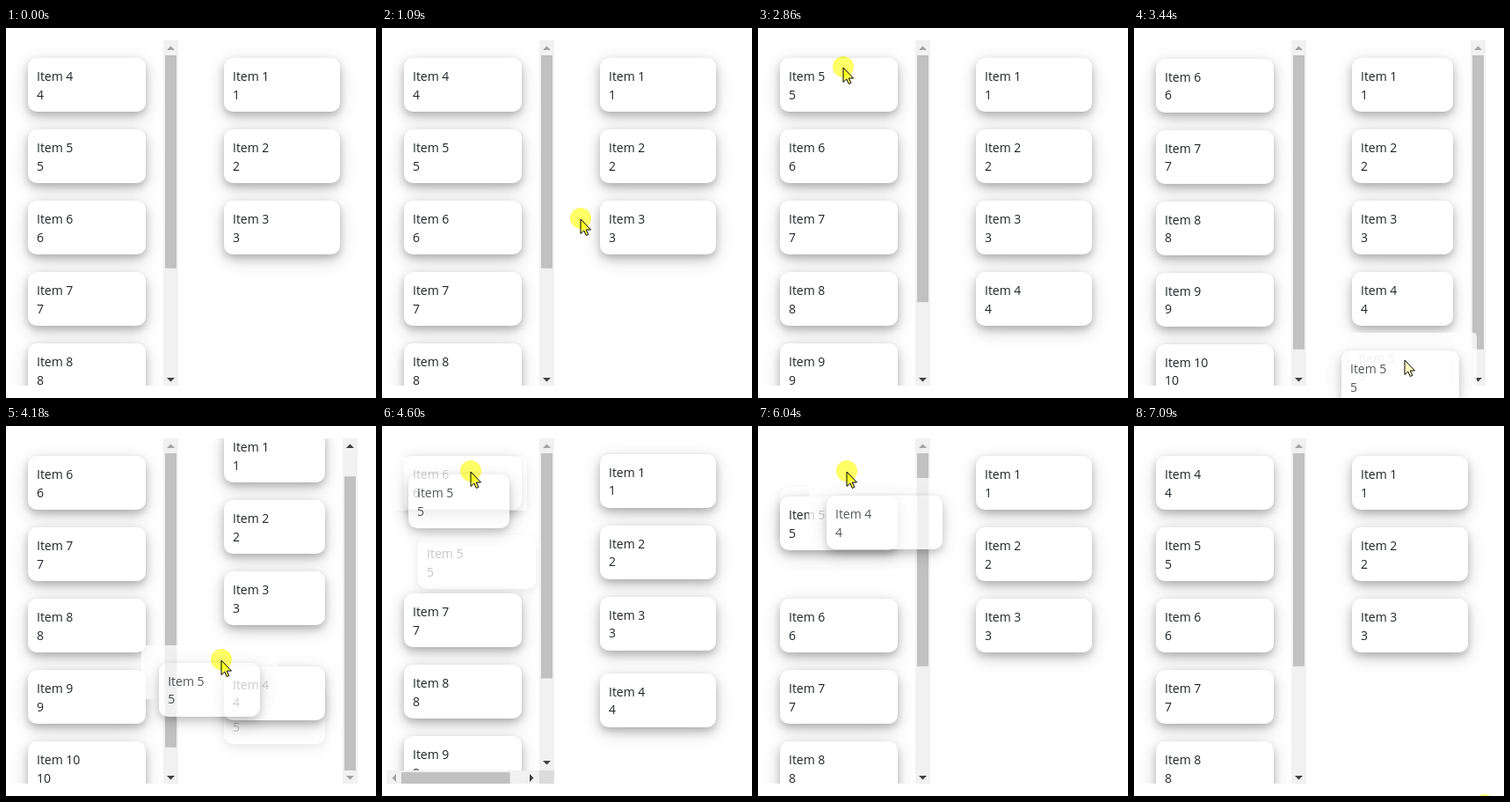
An HTML page for the animation above (7.18 s loop, 421 px wide and 420 px high).

```html
<!DOCTYPE html>
<html lang="en">
<head>
<meta charset="utf-8">
<title>Dragging items between two lists</title>
<style>
html, body { margin: 0; width: 100%; height: 100%; overflow: hidden; background: #fff; }
#stage { position: relative; width: 421px; height: 420px; overflow: hidden; }
#stage div, #stage svg { position: absolute; }
.list { top: 14px; overflow: hidden; }
.card {
  box-sizing: border-box; height: 61px; padding: 11px 10px 0; border-radius: 10px; background: #fff;
  box-shadow: 0 4px 8px rgba(0, 0, 0, .2), 0 6px 20px rgba(0, 0, 0, .19);
  color: #212529; white-space: nowrap; font: 14px/20.5px "Open Sans", "Noto Sans", sans-serif;
}
.ghost { height: 61px; border-radius: 4px; background: #fff; opacity: .77; }
.spot { width: 24px; height: 24px; border-radius: 50%; background: #ffff66; mix-blend-mode: multiply; }
</style>
</head>
<body>
<div id="stage"></div>
<script>
const LOOP = 7180, FLIP = 250, PITCH = 81, TOP = 14, BOTTOM = 406, HEIGHT = 394;
const stage = document.getElementById('stage');

// Each move puts one item at an index of the left (0) or right (1) list
const moves = [
  { at: 1490, id: 4, side: 1, index: 3 },
  { at: 3247, id: 5, side: 1, index: 4 },
  { at: 4150, id: 5, side: 1, index: 3 },
  { at: 4455, id: 5, side: 0, index: 1 },
  { at: 4670, id: 5, side: 0, index: 0 },
  { at: 5720, id: 4, side: 0, index: 1 },
  { at: 5980, id: 4, side: 0, index: 0 },
];
const steps = [{ at: 0, lists: [[4, 5, 6, 7, 8, 9, 10], [1, 2, 3]] }];
for (const { at, id, side, index } of moves) {
  const lists = steps.at(-1).lists.map(ids => ids.filter(i => i !== id));
  lists[side].splice(index, 0, id);
  steps.push({ at, lists });
}

// The dragged card hangs at a fixed offset from the cursor
const drags = [
  { id: 4, from: 1140, to: 2000, dx: 54, dy: 15, width: 134 },
  { id: 5, from: 2900, to: 3640, dx: 72, dy: 11, width: 134 },
  { id: 5, from: 3920, to: 4740, dx: 71, dy: -3, width: 115 },
  { id: 4, from: 5360, to: 6150, dx: 23, dy: -27, width: 132 },
];

// Cursor stops: time, x, y
const stops = [
  [130, 352, 434], [820, 91, 60], [1090, 226, 217], [1830, 298, 281], [2190, 296, 278],
  [2860, 97, 45], [3440, 308, 377], [3910, 320, 377], [4600, 101, 52], [4740, 101, 52],
  [5340, 300, 295], [5480, 245, 238], [6000, 101, 52], [6200, 101, 52],
  [6820, 399, 450], [7090, 399, 431],
];

function cursorAt(t) {
  const i = stops.findIndex(s => s[0] > t);
  if (i < 1) return stops.at(i).slice(1);
  const [t0, x0, y0] = stops[i - 1], [t1, x1, y1] = stops[i];
  const p = (t - t0) / (t1 - t0), k = p * p * (3 - 2 * p);
  return [x0 + (x1 - x0) * k, y0 + (y1 - y0) * k];
}

const box = (x, y, w, h, color) =>
  `<div style="left:${x}px;top:${y}px;width:${w}px;height:${h}px;background:${color}"></div>`;

const card = (id, x, y, width, opacity = 1) =>
  `<div class="card" style="left:${x}px;top:${y}px;width:${width}px;opacity:${opacity}">Item ${id}<br>${id}</div>`;

// The right list scrolls to its end during the third drag
const rightScroll = t => t < 3920 || t >= 4455 ? 0 : Math.min(31, (t - 3920) / 5);

function slot({ lists: [left, right] }, id, t) {
  const i = left.indexOf(id);
  return i >= 0 ? [25, 34 + PITCH * i] : [248, 34 + PITCH * right.indexOf(id) - rightScroll(t)];
}

// Items glide from their previous slot to the new one
function place(n, id, t) {
  const [x, y] = slot(steps[n], id, t), { at } = steps[n];
  if (!n || t > at + FLIP) return [x, y];
  const [px, py] = slot(steps[n - 1], id, at - 1);
  const rest = (1 - (t - at) / FLIP) ** 3;
  return [x + (px - x) * rest, y + (py - y) * rest];
}

function scrollbar(x, y, view, content, scroll, flat) {
  const track = view - 34, size = track * view / content;
  const thumb = 17 + scroll / content * track;
  const arrow = (d, off) => `<path d="${d}" fill="${off ? '#a3a3a3' : '#404040'}"/>`;
  return `<svg style="left:${x}px;top:${y}px" width="${flat ? view : 17}" height="${flat ? 17 : view}">
    <g ${flat ? 'transform="matrix(0 1 1 0 0 0)"' : ''}>
    <path d="M0 0H17V${view}H0Z" fill="#f1f1f1"/>
    <path d="M2 ${thumb}h13v${size}h-13Z" fill="#c1c1c1"/>
    ${arrow('M4 11h9l-4.5-4.5Z', scroll <= 0)}
    ${arrow(`M4 ${view - 11}h9l-4.5 4.5Z`, scroll >= content - view - 1)}</g></svg>`;
}

function list(n, side, t, held) {
  const ids = steps[n].lists[side], left = side ? 228 : 5, full = side ? 172 : 191;
  const content = PITCH * ids.length + 20, scrolls = content > HEIGHT;
  const inner = full - (scrolls ? 17 : 0);
  const spots = ids.map(id => [id, ...place(n, id, t)]);
  const over = side ? 0 : Math.max(...spots.map(s => s[1] - 25));
  const flat = over > .5, height = HEIGHT - (flat ? 17 : 0);
  const cards = spots.map(([id, x, y]) =>
    card(id, x - left, y - TOP, inner - 40, id === held ? .25 : 1)).join('');
  const clip = Math.min(height, BOTTOM - TOP);
  let html = `<div class="list" style="left:${left}px;width:${inner}px;height:${clip}px">${cards}</div>`;
  if (scrolls) html += scrollbar(left + inner, TOP, height, content, side ? rightScroll(t) : 0);
  if (flat) html += scrollbar(left, TOP + height, inner, inner + over + 7, 0, true)
    + box(left + inner, TOP + height, 17, 17, '#dcdcdc');
  return html + box(left, BOTTOM, full, 14, '#fff');
}

const ghost = ({ id, dx, dy, width }, x, y) =>
  `<div class="ghost" style="left:${x - dx - 20}px;top:${y - dy - 20}px;width:${width + 40}px">${card(id, 20, 20, width)}</div>`;

// The highlight is off while the pointer rests after the second drag
function cursor(t, x, y) {
  const plain = t > 3400 && t < 3910;
  return `<svg style="left:${x - 1}px;top:${y - 1}px" width="16" height="22">
    <path transform="translate(1 1)" d="M0 0V16.5L3.8 13 6.3 18.5 8.8 17.5 6.3 12H11.5Z"
      fill="${plain ? '#ffffc0' : '#ffff50'}" stroke="#000"/></svg>`
    + (plain ? '' : `<div class="spot" style="left:${x - 12}px;top:${y - 13}px"></div>`);
}

function draw(t) {
  const n = steps.findLastIndex(s => s.at <= t);
  const drag = drags.find(d => t >= d.from && t < d.to);
  const [x, y] = cursorAt(t);
  stage.innerHTML = list(n, 0, t, drag?.id) + list(n, 1, t, drag?.id)
    + (drag ? ghost(drag, x, y) : '') + cursor(t, x, y);
}

const begin = performance.now();
function tick() {
  draw((performance.now() - begin) % LOOP);
  requestAnimationFrame(tick);
}
tick();
</script>
</body>
</html>
```
